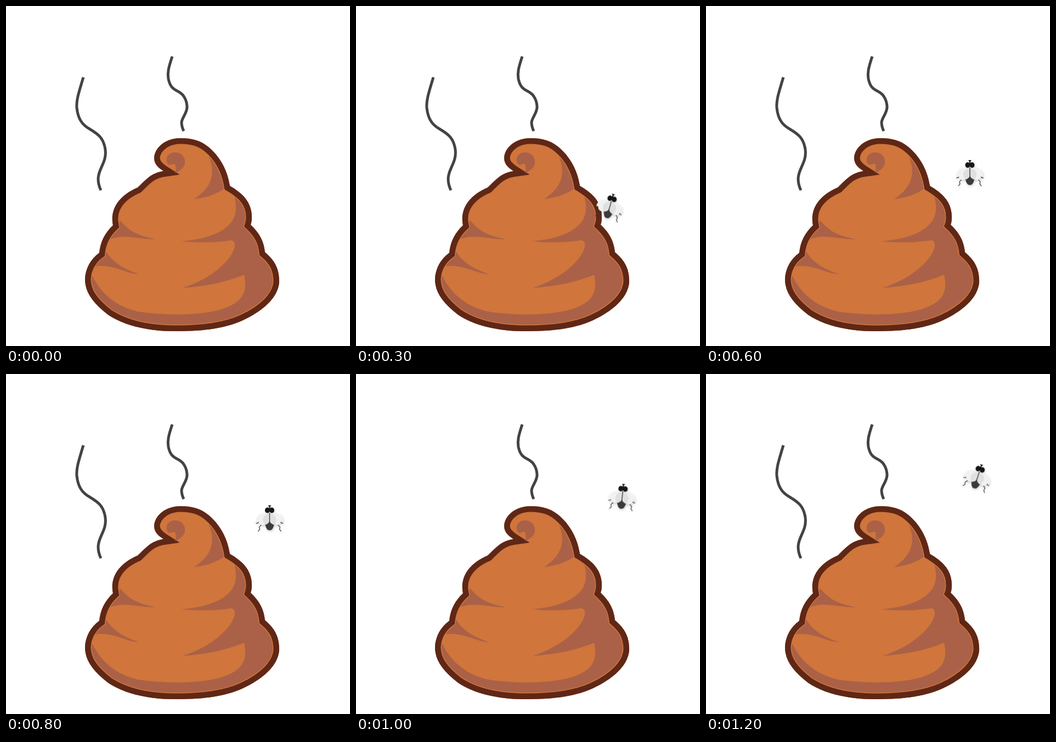
Write an HTML page that moves like this. It is 627 px wide and 620 px high and loops after 1300 ms.

```html
<!DOCTYPE html>
<html lang="en">
<head>
<meta charset="utf-8">
<title>Fly and steam</title>
<style>
  html, body { margin: 0; width: 100%; height: 100%; overflow: hidden; background: #fff; }
  svg { display: block; width: 627px; height: 620px; }
  .steam { fill: none; stroke: #434345; stroke-width: 5; }
  .body { fill: #d0753b; }
  .shade { fill: #ab6147; }
  .rim { fill: none; stroke: #d0753b; stroke-width: 24; }
  .edge { fill: none; stroke: #5f2716; stroke-width: 21; }
  .legs { fill: none; stroke: #3a3a3a; stroke-width: 1.2; }
  #fly { filter: drop-shadow(1px 2px 2px rgba(0, 0, 0, .2)); }
</style>
</head>
<body>
<svg viewBox="0 0 627 620">
  <defs>
    <path id="outline" d="M318 241C347 241 364 249 383 271C399 291 405 310 408 328C432 342 448 358 448 385Q448 393 446 399C463 415 470 430 472 449C491 465 498 480 498 503C496 531 470 555 432 573C395 590 350 593 310 593C255 593 215 582 186 563C158 541 144 522 144 498C145 478 154 462 170 450C172 430 180 414 195 400C189 371 205 346 240 331C255 316 266 304 287 301C276 294 270 287 270 277C271 257 292 241 318 241Z"/>
    <clipPath id="inside"><use href="#outline"/></clipPath>
    <!-- the fly's route, followed by its centre -->
    <path id="route" d="M436 404C462 366 486 342 481 306C478 265 482 225 495 188.5"/>
  </defs>

  <path id="steamL" class="steam" d="M141 130C132 160 128 172 129 185C131 205 138 216 152 224C167 233 178 240 181 262C184 285 168 297 168 315Q168 326 173 336"/>
  <path id="steamR" class="steam" d="M303 92C296 113 294 122 296 133C299 147 304 151 314 156C326 162 330 175 330 185C329 197 321 203 320 212Q320 220 324 228"/>

  <!-- shades run past the outline; the clip and the edge stroke trim them -->
  <g clip-path="url(#inside)">
    <use href="#outline" class="body"/>
    <g class="shade">
      <path d="M369 272L420 280V334H396C378 346 362 350 343 352C369 335 386 311 369 272Z"/>
      <path d="M416 346L510 340V600H140V480L158 493C174 526 202 548 240 557C290 565 350 564 385 555C432 543 441 522 434 490C405 502 370 511 321 514C370 500 412 465 417 438Q418 428 410 427C385 432 350 432 319 429C370 425 400 411 413 391C421 378 420 362 416 346Z"/>
      <path d="M209 392C225 412 245 420 272 425C240 427 208 411 180 431V400Z"/>
      <path d="M182 447C195 468 215 480 243 489C215 488 197 470 160 475V450Z"/>
    </g>
    <use href="#outline" class="rim"/>
    <use href="#outline" class="edge"/>
  </g>
  <path class="shade" d="M293 284C291 272 300 266 310 267C322 268 327 277 326 287C325 296 317 299 309 305C310 298 310 293 308 288Q301 288 299 290Q294 289 293 284Z"/>

  <g id="fly">
    <path fill="#3b3b3d" d="M0 4L8 11Q6 21 0 21Q-6 21-8 11Z"/>
    <g id="side">
      <path class="legs" d="M-15 11L-19 15L-18 19L-21 23M-18 4L-22 8L-25 8"/>
      <path fill="#f1f1f1" d="M-2-9Q-14-12-20-6Q-25-1-24 5Q-20 3-19 9Q-13 14-9 10Q-2 5-1-5Z"/>
      <path fill="#e0e0e0" d="M-1-9Q-9-9-12-1Q-13 6-8 11Q-2 9-.5 5Z"/>
      <ellipse fill="#161618" cx="-4" cy="-15.5" rx="4.5" ry="5"/>
    </g>
    <use href="#side" transform="scale(-1 1)"/>
    <path stroke="#333" stroke-width="1.3" d="M0-11V8"/>
    <path fill="#161618" d="M-3-24.5H3L1-22V-18H-1V-22Z"/>
  </g>
</svg>
<script>
  const STEP = 100, STEPS = 13;
  const [route, fly, steamL, steamR] =
    ['route', 'fly', 'steamL', 'steamR'].map(id => document.getElementById(id));
  const length = route.getTotalLength();
  const show = (el, on) => el.setAttribute('visibility', on ? 'visible' : 'hidden');

  function draw(ms) {
    const n = Math.floor(ms / STEP) % STEPS;
    show(steamR, n < 4 || n > 5);
    show(steamL, n < 10 || n > 11);
    show(fly, n > 0);

    const p = Math.max(0, n - 1) / (STEPS - 2);
    const eased = p * (1 + .12 * (1 - p));      // slows down slightly
    const { x, y } = route.getPointAtLength(length * eased);
    const tilt = Math.max(0, 37 - 7 * n, 6 * n - 54);  // upright midway
    fly.setAttribute('transform', `translate(${x} ${y}) rotate(${tilt})`);
  }

  const start = performance.now();
  function tick() {
    draw(performance.now() - start);
    requestAnimationFrame(tick);
  }
  tick();
</script>
</body>
</html>
```
